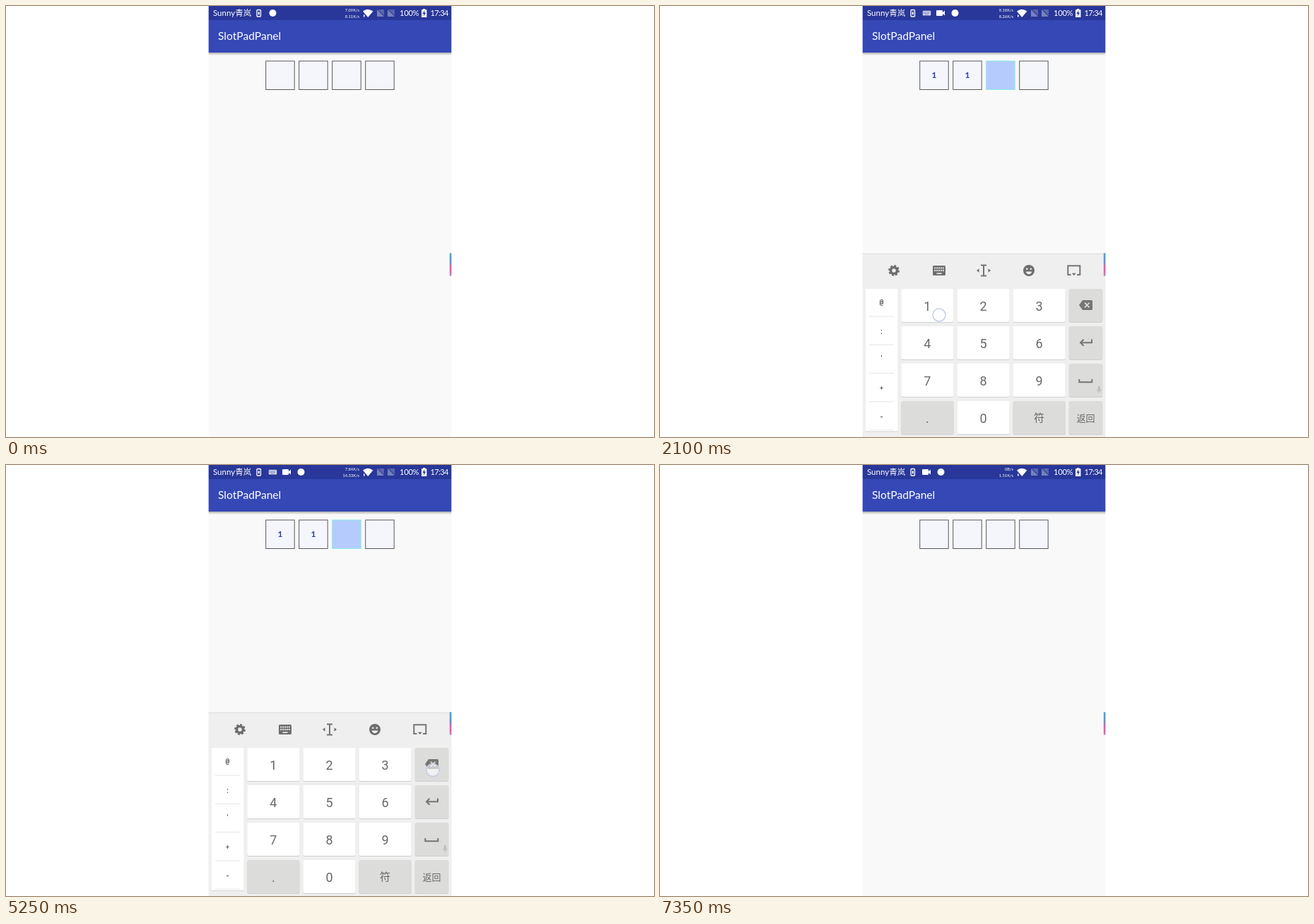
These frames come from a looping animation (917x611 px, 7500 ms). An HTML page:

```html
<!DOCTYPE html>
<html lang="zh">
<head>
<meta charset="utf-8">
<title>Code entry</title>
<style>
html, body { margin: 0; width: 100%; height: 100%; overflow: hidden; background: #fff; }
svg { display: block; width: 917px; height: 611px; }
text { font-family: Lato, "Noto Sans CJK SC", "Noto Sans CJK", sans-serif; }
.mid { text-anchor: middle; }
.end { text-anchor: end; }
.key { fill: #fff; }
.key.gray { fill: #dcdcda; }
.num { font: 18px Roboto, "Noto Sans CJK SC", "Noto Sans CJK", sans-serif; fill: #686868; }
.sym { font: 10px "Noto Sans Mono", monospace; fill: #33363f; }
.cell { fill: #f4f6fc; stroke: #5a5a5c; }
.cell.on { fill: #b6cbfd; stroke: #82efe6; }
.digit { font-size: 12px; font-weight: 700; fill: #2b3b9f; }
.line { fill: none; stroke: #757575; stroke-width: 2; }
</style>
</head>
<body>
<svg viewBox="0 0 917 611">
  <defs>
    <linearGradient id="shade" x2="0" y2="1">
      <stop stop-color="#000" stop-opacity=".3"/>
      <stop offset="1" stop-color="#000" stop-opacity="0"/>
    </linearGradient>
    <linearGradient id="strip" x2="0" y2="1">
      <stop stop-color="#46a6de"/>
      <stop offset=".4" stop-color="#5f8fd0"/>
      <stop offset=".6" stop-color="#e05fae"/>
      <stop offset=".85" stop-color="#e35cab"/>
      <stop offset="1" stop-color="#b59ad0"/>
    </linearGradient>
    <g id="nosignal">
      <path d="M0 0V10H10Z" fill="#7781bd"/>
      <path d="M1.5 0H10V8.5Z" fill="#5a66ae"/>
    </g>
  </defs>

  <rect x="286.7" width="343.6" height="611" fill="#f9f9f9"/>
  <rect x="286.7" y="66" width="343.6" height="4" fill="url(#shade)"/>
  <rect x="286.7" y="20" width="343.6" height="46" fill="#3548b6"/>
  <rect x="286.7" width="343.6" height="20" fill="#283799"/>
  <text x="300" y="48" font-size="15.6" fill="#fff">SlotPadPanel</text>

  <g fill="#fff">
    <text x="293" y="14" font-size="11.5">Sunny青岚</text>
    <rect x="355" y="5.5" width="5.5" height="9.5" rx="1" fill="none" stroke="#fff" stroke-width="1.3"/>
    <rect x="356.8" y="8.3" width="2" height="4"/>
    <g id="kbIcon">
      <rect x="371.8" y="6.8" width="11.4" height="6.6" rx="1" fill="#d5d8ec"/>
      <path d="M373 8.8H382M373 10.4H382M375 12.2H380" stroke="#283799" stroke-width=".8" stroke-dasharray="1 .8"/>
    </g>
    <path id="camIcon" d="M-6 -3q0 -1 1 -1H2q1 0 1 1V-1L6 -3.5V3.5L3 1V3q0 1 -1 1H-5q-1 0 -1 -1Z"/>
    <circle id="dotIcon" r="5"/>
    <text id="up" class="end" x="500" y="8" font-size="5.8"></text>
    <text id="down" class="end" x="500" y="17" font-size="5.8"></text>
    <path d="M505 7.6Q512.2 2 519.4 7.6L512.2 16Z"/>
    <path d="M506 12.5h1.6v3h-1.6z"/>
    <use href="#nosignal" x="525" y="5"/>
    <use href="#nosignal" x="540" y="5"/>
    <text x="557" y="14" font-size="11.2" letter-spacing="-.3">100%</text>
    <path d="M588 5.2H590V4H593.3V5.2H595.4V16H588Z"/>
    <path d="M592.3 6.3L589.4 11H591.3V14.5L594.1 9.6H592.3Z" fill="#283799"/>
    <text x="600.5" y="14" font-size="11" letter-spacing="-.6">17:34</text>
  </g>

  <g id="cells"></g>

  <g id="keyboard">
    <rect x="286.7" y="351" width="343.6" height="262" fill="#efefef"/>
    <rect x="286.7" y="350.6" width="343.6" height="1" fill="#dcdcdc"/>
    <g fill="#6e6e6e">
      <g fill="none" stroke="#6e6e6e">
        <circle cx="331" cy="375" r="4.5" stroke-width="3.6"/>
        <circle cx="331" cy="375" r="6.6" stroke-width="2.6" stroke-dasharray="2.9 2.284"/>
      </g>
      <rect x="386" y="368" width="18" height="14" rx="1.6"/>
      <path d="M388.3 371.5H402M388.3 375H402" stroke="#efefef" stroke-width="1.8" stroke-dasharray="1.8 1.1"/>
      <path d="M391.5 379.2H398.5" stroke="#efefef" stroke-width="1.6"/>
      <path d="M454 367.6H462M458 367.6V382.4M454 382.4H462" class="line" stroke-width="1.8"/>
      <path d="M451.5 372.2V377.8L448 375ZM464.5 372.2V377.8L468 375Z"/>
      <circle cx="522" cy="375" r="8"/>
      <g fill="#efefef">
        <circle cx="519.2" cy="372.7" r="1.3"/>
        <circle cx="524.8" cy="372.7" r="1.3"/>
        <path d="M517.6 376.5H526.4Q525 380.3 522 380.3T517.6 376.5Z"/>
      </g>
      <path d="M581.5 381H577.3V368.3H594.3V381H590" class="line"/>
      <path d="M582.8 378.7H588.8L585.8 382Z"/>
    </g>
    <rect x="290.6" y="402" width="46" height="202" rx="2" fill="#d5d5d5"/>
    <rect x="290.6" y="401" width="46" height="202" rx="2" fill="#fff"/>
    <g id="keys"></g>
    <g fill="#757575">
      <path d="M593 424L598 417H610.5Q612 417 612 418.5V429.5Q612 431 610.5 431H598Z"/>
      <path d="M601 420.7L607.6 427.3M607.6 420.7L601 427.3" stroke="#dcdcda" stroke-width="1.7"/>
      <path d="M611 472.5V477.2H595.5M599.5 472.7L595 477.2L599.5 481.7" class="line"/>
      <path d="M593.3 529V533.3H611.3V529" class="line"/>
    </g>
    <g fill="none" stroke="#b9b9b9">
      <path d="M621.3 540V544.3" stroke-width="2.4" stroke-linecap="round"/>
      <path d="M618.5 543.5Q618.7 546.5 621.3 546.5T624 543.5M621.3 546.5V549"/>
    </g>
    <rect id="scroll" x="335" y="400.5" width="2.2" height="91" fill="#b1b1b8"/>
  </g>

  <rect x="627.8" y="350.3" width="2.6" height="32.5" fill="url(#strip)"/>
  <circle id="touch" r="9" fill="#fff" fill-opacity=".6" stroke="#c6cdea" stroke-width="1.5"/>
</svg>

<script>
const LOOP = 7500, STEP = 150;
const $ = id => document.getElementById(id);

function add(parent, tag, attrs, text) {
  const el = document.createElementNS("http://www.w3.org/2000/svg", tag);
  for (const name in attrs) el.setAttribute(name, attrs[name]);
  if (text) el.textContent = text;
  return parent.appendChild(el);
}

const cells = [0, 1, 2, 3].map(i => {
  const x = 367.7 + i * 47;
  return {
    box: add($("cells"), "rect", { x, y: 78, width: 40.5, height: 40.5, class: "cell" }),
    digit: add($("cells"), "text", { x: x + 20.3, y: 102.3, class: "mid digit" })
  };
});

const columns = [[341.3, 74.2], [420.4, 74.2], [499.5, 74.2], [578.7, 47.6]];
["123 ", "456 ", "789 ", ".0符返"].forEach((row, r) => {
  [...row].forEach((label, c) => {
    const [x, width] = columns[c], y = 401 + r * 53;
    const gray = c === 3 || (r === 3 && c !== 1);
    const box = { x, width, height: 47, rx: 2.5 };
    add($("keys"), "rect", { ...box, y: y + 1, fill: "#cfcfcf" });
    add($("keys"), "rect", { ...box, y, class: gray ? "key gray" : "key" });
    if (label === " ") return;
    const back = label === "返";
    const size = back ? 13 : label === "符" ? 15 : 18;
    add($("keys"), "text", {
      x: x + width / 2, y: y + (size < 18 ? 28.5 : 30.5), class: "mid num", style: `font-size:${size}px`
    }, back ? "返回" : label);
  });
});

[["@", 424], [":", 464.5], ["'", 503], ["+", 544.5], ["-", 584.5]].forEach(([mark, y], i) => {
  add($("keys"), "text", { x: 313.5, y, class: "mid sym" }, mark);
  add($("keys"), "rect", { x: 296, y: 439.5 + i * 40.3, width: 35, height: 1, fill: "#e4e4e4" });
});

// Each entry changes part of the state from its time on.
const one = [395, 438], two = [468, 436], three = [546, 436], erase = [604, 432.5];
const story = [
  [0, { up: "7.09K/s", down: "8.11K/s", code: "", focus: -1, rise: 0, touch: null, cam: 0, ime: 0, scroll: 0 }],
  [150, { cam: 1 }],
  [750, { touch: [388, 99], up: "7.91K/s", down: "8.18K/s" }],
  [900, { focus: 0, ime: 1, rise: .35 }],
  [1050, { touch: null, rise: .85 }],
  [1200, { rise: 1, scroll: 1 }],
  [1500, { touch: one, scroll: 0 }],
  [1650, { code: "1", focus: 1 }],
  [1800, { touch: null, up: "8.18K/s", down: "8.26K/s" }],
  [1950, { touch: one }],
  [2100, { code: "11", focus: 2 }],
  [2250, { touch: null }],
  [2400, { touch: one }],
  [2550, { code: "111", focus: 3 }],
  [2700, { touch: null }],
  [2850, { up: "8.20K/s", down: "8.40K/s" }],
  [3450, { touch: erase }],
  [3600, { code: "11", focus: 2, scroll: 1 }],
  [3750, { touch: two, up: "8.03K/s", down: "8.22K/s" }],
  [3900, { code: "112", focus: 3 }],
  [4050, { touch: three }],
  [4200, { code: "1123", focus: -1 }],
  [4350, { touch: null }],
  [4650, { scroll: 0 }],
  [4800, { touch: erase }],
  [4950, { code: "112", focus: 3 }],
  [5100, { touch: null, up: "7.84K/s", down: "14.33K/s" }],
  [5250, { touch: erase, code: "11", focus: 2 }],
  [5400, { touch: null }],
  [5550, { touch: erase, code: "1", focus: 1 }],
  [5700, { touch: null }],
  [5850, { touch: erase, code: "", focus: 0 }],
  [6000, { focus: -1 }],
  [6150, { touch: null }],
  [6600, { rise: .7 }],
  [6750, { rise: .2 }],
  [6900, { rise: 0, ime: 0, up: "0B/s", down: "1.51K/s" }]
];

const show = (el, on) => { el.style.display = on ? "" : "none"; };
const place = (el, x, y) => el.setAttribute("transform", `translate(${x} ${y})`);

function draw(time) {
  const s = Object.assign({}, ...story.filter(e => e[0] <= time).map(e => e[1]));
  cells.forEach(({ box, digit }, i) => {
    box.classList.toggle("on", i === s.focus);
    digit.textContent = s.code[i] || "";
  });
  $("up").textContent = s.up;
  $("down").textContent = s.down;
  show($("kbIcon"), s.ime);
  show($("camIcon"), s.cam);
  place($("camIcon"), 377 + 20 * s.ime, 10);
  place($("dotIcon"), 377.5 + 20 * (s.ime + s.cam), 10);
  show($("keyboard"), s.rise);
  place($("keyboard"), 0, 260 * (1 - s.rise));
  show($("scroll"), s.scroll);
  show($("touch"), s.touch);
  if (s.touch) place($("touch"), ...s.touch);
}

let last = -1;
const start = performance.now();
function tick() {
  const time = Math.floor((performance.now() - start) % LOOP / STEP) * STEP;
  if (time !== last) draw(last = time);
  requestAnimationFrame(tick);
}
tick();
</script>
</body>
</html>
```
